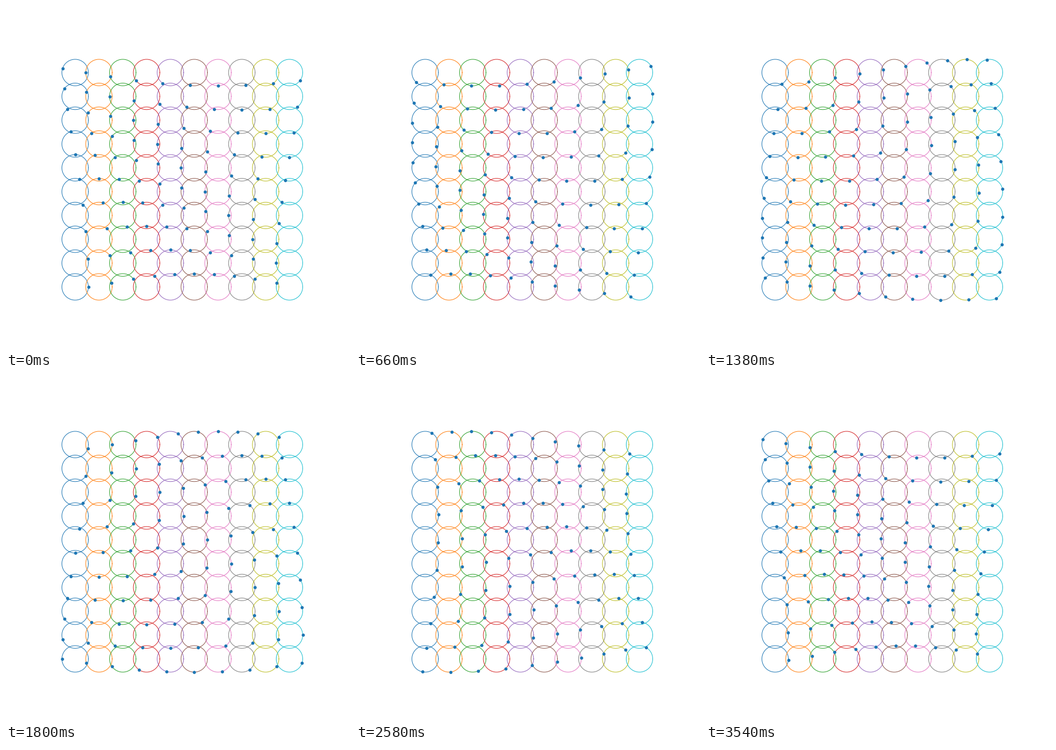
A matplotlib script that plays this animation: 600x600 px, repeating every 3600 ms.

```python
import numpy as np
import matplotlib.pyplot as plt
from matplotlib.animation import FuncAnimation

N = 10            # circles per side
GAP = 1.8         # distance between centres, in radii
FRAMES = 60
INTERVAL = 60     # ms

fig, ax = plt.subplots(figsize=(6, 6), dpi=100)
ax.set_aspect("equal")
ax.axis("off")

turn = np.linspace(0, 2 * np.pi, 201)
for col in range(N):
    for row in range(N):
        ax.plot(GAP * col + np.cos(turn), GAP * row + np.sin(turn),
                color=f"C{col}", lw=0.7)

pad = 1 + 0.05 * (GAP * (N - 1) + 2)
ax.set_xlim(-pad, GAP * (N - 1) + pad)
ax.set_ylim(-pad, GAP * (N - 1) + pad)

cols, rows = (g.ravel() for g in np.meshgrid(np.arange(N), np.arange(N)))
phase = (cols + rows) * np.pi / N
dots, = ax.plot([], [], ".", color="C0", zorder=3)


def update(frame):
    angle = phase + 2 * np.pi * frame / FRAMES
    dots.set_data(GAP * cols + np.cos(angle), GAP * rows + np.sin(angle))
    return dots,


anim = FuncAnimation(fig, update, frames=FRAMES, interval=INTERVAL,
                     repeat=True, repeat_delay=0)
plt.show()
```
